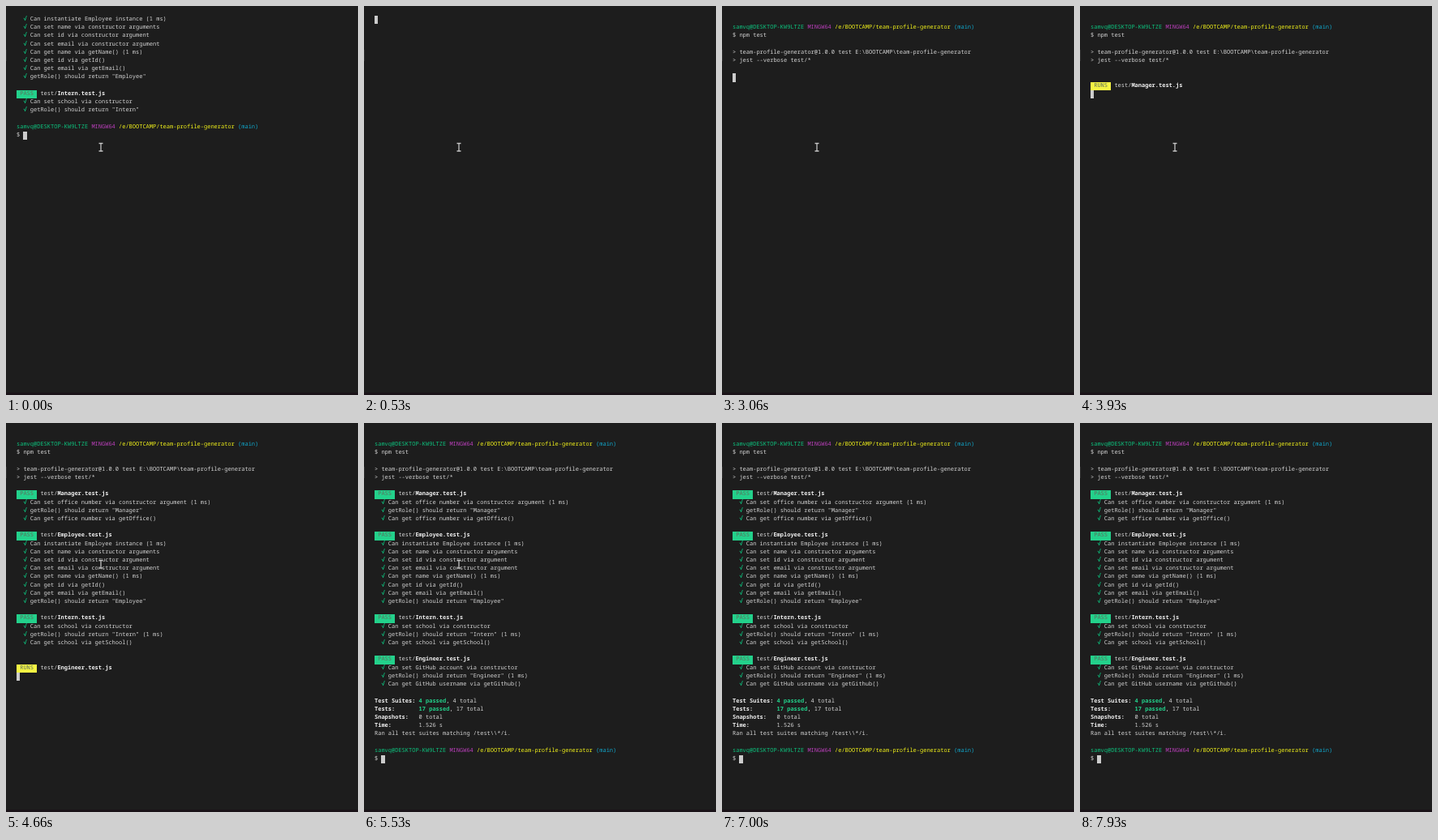
Animation of 434x480 px, one loop 8 s. Source, as an HTML page:

```html
<!DOCTYPE html>
<html lang="en">
<head>
<meta charset="utf-8">
<title>Terminal test run</title>
<style>
  html, body { margin: 0; width: 100%; height: 100%; overflow: hidden; background: #1d1d1d; }
  #stage { position: relative; width: 434px; height: 480px; overflow: hidden; background: #1d1d1d; }
  #stage::after {
    content: ""; position: absolute; left: 0; right: 0; bottom: 0; height: 3px; background: #1a1318;
  }
  #edge { position: absolute; left: 0; top: 54px; width: 1px; height: 14px; background: #303030; }
  #term {
    position: absolute; left: 13px; top: 12px; margin: 0; white-space: pre; color: #d6d6d6;
    font: 500 7px/10.2px "Noto Sans Mono", "DejaVu Sans Mono", monospace;
    font-variant-ligatures: none; text-rendering: geometricPrecision;
  }
  .user, .tick { color: #0dc47f; }
  .tick { font-weight: 700; }
  .sys { color: #bc3fbc; }
  .path { color: #f5f51a; }
  .branch { color: #11a8cd; }
  .bold { color: #f0f0f0; font-weight: 700; }
  .good { color: #23d18b; font-weight: 700; }
  .pass, .runs, .caret { display: inline-block; vertical-align: top; height: 10.2px; }
  .pass, .runs { color: #5c6c5c; }
  .pass { background: #23d18b; }
  .runs { background: #f5f543; }
  .caret { background: #ccc; }
  #pointer { position: absolute; left: 113px; top: 168px; animation: pointer 8s step-end infinite; }
  @keyframes pointer { 0% { opacity: 1; } 78.25%, 100% { opacity: 0; } }
</style>
</head>
<body>
<div id="stage">
  <div id="edge"></div>
  <pre id="term"></pre>
  <svg id="pointer" width="8" height="13" viewBox="0 0 8 13" fill="none">
    <defs><path id="beam" d="M1.5 1.5H6.5M4 1.5V11M1.5 11H6.5"/></defs>
    <use href="#beam" stroke="#111" stroke-width="2.4"/>
    <use href="#beam" stroke="#c8c8c8" stroke-width="1.3"/>
  </svg>
</div>
<script>
const LOOP = 8000;
const term = document.getElementById("term");

const span = (cls, text) => `<span class="${cls}">${text}</span>`;
const caret = span("caret", " ");
const prompt = [
  span("user", "samvq@DESKTOP-KW9LTZE"), span("sys", "MINGW64"),
  span("path", "/e/BOOTCAMP/team-profile-generator"), span("branch", "(main)")
].join(" ");

const suites = [
  ["Manager", [
    "Can set office number via constructor argument (1 ms)",
    'getRole() should return "Manager"',
    "Can get office number via getOffice()"]],
  ["Employee", [
    "Can instantiate Employee instance (1 ms)",
    "Can set name via constructor arguments",
    "Can set id via constructor argument",
    "Can set email via constructor argument",
    "Can get name via getName() (1 ms)",
    "Can get id via getId()",
    "Can get email via getEmail()",
    'getRole() should return "Employee"']],
  ["Intern", [
    "Can set school via constructor",
    'getRole() should return "Intern" (1 ms)',
    "Can get school via getSchool()"]],
  ["Engineer", [
    "Can set GitHub account via constructor",
    'getRole() should return "Engineer" (1 ms)',
    "Can get GitHub username via getGithub()"]]
];

const badge = (cls, label, name) =>
  `${span(cls, ` ${label} `)} test/${span("bold", name + ".test.js")}`;
const check = text => `  ${span("tick", "√")} ${text}`;
const suite = ([name, tests]) => [badge("pass", "PASS", name), ...tests.map(check), ""];
const field = (label, value) => span("bold", label.padEnd(13)) + value;

const oldRun = [
  ...suite(suites[1]).slice(1),
  ...suite(["Intern", [suites[2][1][0], 'getRole() should return "Intern"']]),
  prompt
];
const header = [
  "", "&gt; team-profile-generator@1.0.0 test E:\\BOOTCAMP\\team-profile-generator",
  "&gt; jest --verbose test/*", ""
];
const summary = [
  field("Test Suites:", span("good", "4 passed") + ", 4 total"),
  field("Tests:", span("good", "17 passed") + ", 17 total"),
  field("Snapshots:", "0 total"),
  field("Time:", "1.526 s"),
  "Ran all test suites matching /test\\\\*/i."
];

// Letters appear evenly from start, one every 67 ms.
const typed = (text, t, start) =>
  "$ " + text.slice(0, Math.max(0, Math.floor((t - start) / 67) + 1)) + caret;

// Times at which each suite finishes.
const finish = [4330, 4460, 4600, 4730];

function screen(t) {
  if (t < 530) return [...oldRun, typed("clear", t, 128)];
  if (t < 600) return [caret];
  const top = ["", prompt];
  if (t < 1930) return [...top, typed("npm test", t, 928)];
  top.push("$ npm test");
  if (t < 2400) return [...top, caret];
  top.push(...header);
  if (t < 3260) return [...top, caret];

  const done = finish.filter(at => t >= at).length;
  top.push(...suites.slice(0, done).flatMap(suite));
  if (done < suites.length)
    return [...top, "", badge("runs", "RUNS", suites[done][0]), caret];
  top.push(...summary);
  return t < 4860 ? [...top, caret] : [...top, "", prompt, "$ " + caret];
}

let shown = "";
const start = performance.now();
function draw() {
  const html = screen((performance.now() - start) % LOOP).join("\n");
  if (html !== shown) term.innerHTML = shown = html;
  requestAnimationFrame(draw);
}
draw();
</script>
</body>
</html>
```
